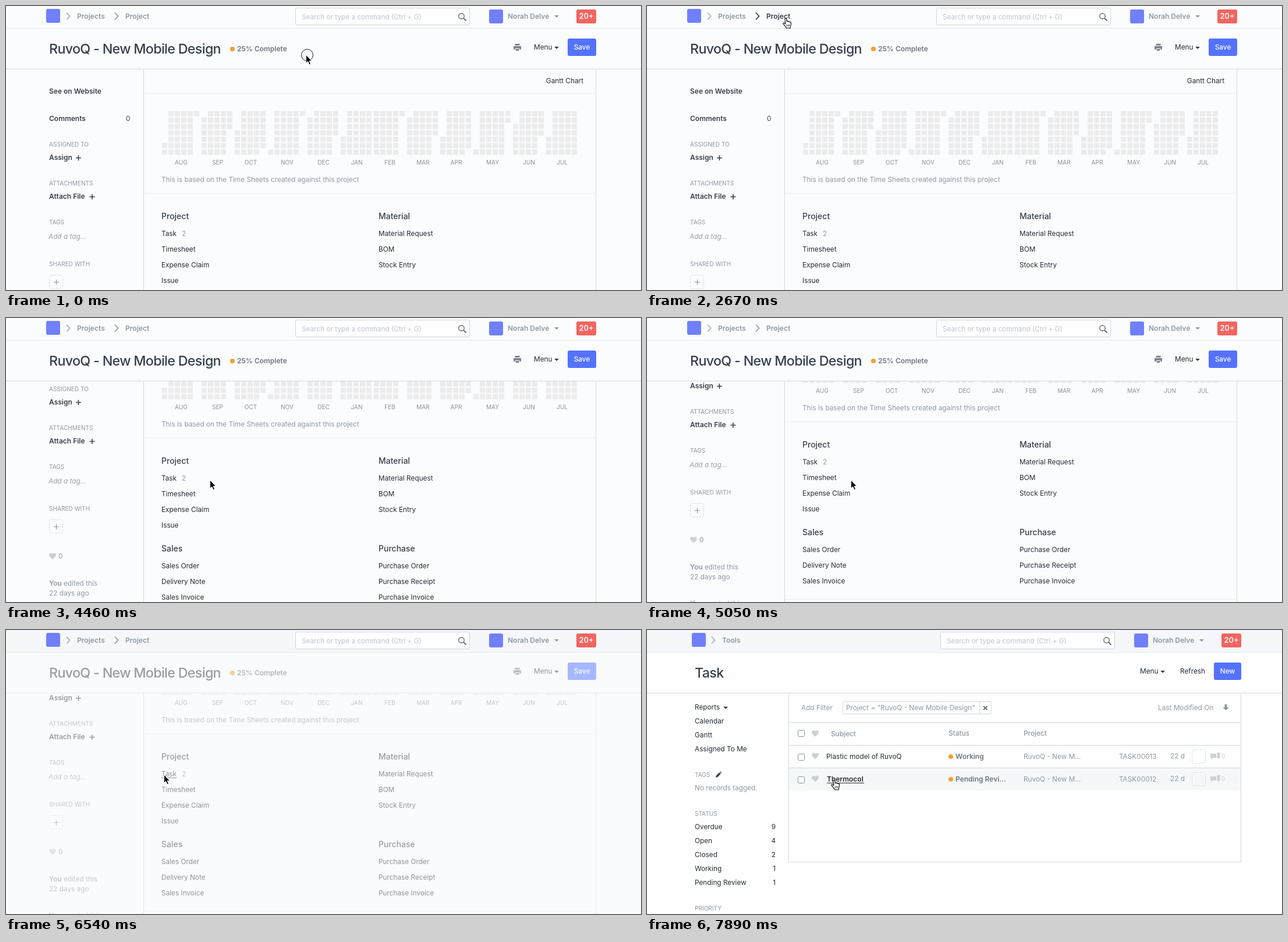
These frames come from a looping animation (1091 by 489 pixels, 8 s). An HTML page:

```html
<!DOCTYPE html>
<html lang="en">
<head>
<meta charset="utf-8">
<title>Project to task list</title>
<style>
html, body { margin: 0; width: 100%; height: 100%; overflow: hidden; background: #fbfcfe; }
svg { display: block; width: 1091px; height: 489px; font-family: Inter, "Open Sans", sans-serif; font-size: 11.8px; }
.semi { font-weight: 600; font-size: 12px; }
.crumb { font-weight: 600; font-size: 12.1px; }
.mid { font-weight: 500; }
.head { font-weight: 500; font-size: 14px; }
.title { font-weight: 500; font-size: 23.3px; letter-spacing: -.03em; }
.label { font-size: 10.1px; }
.badge { font-weight: 600; font-size: 12.8px; }
</style>
</head>
<body>
<svg id="stage" viewBox="0 0 1091 489"></svg>
<script>
const INK = '#36414c', GREY = '#8d99a6', SLATE = '#6c7680', EDGE = '#d1d8dd', PALE = '#ebeef1';
const BLUE = '#5472ff', LOGO = '#7080fb', AMBER = '#f7a030', DARK = '#262d34';
const PRODUCT = 'RuvoQ', PROJECT = PRODUCT + ' - New Mobile Design', USER = 'Norah Delve';

const text = (x, y, s, cls = '', fill = INK, more = '') =>
  `<text x="${x}" y="${y}" class="${cls}" fill="${fill}" ${more}>${s}</text>`;
const rect = (x, y, w, h, fill, more = '') =>
  `<rect x="${x}" y="${y}" width="${w}" height="${h}" fill="${fill}" ${more}/>`;
const path = (d, stroke, width = 1, more = '') =>
  `<path d="${d}" fill="none" stroke="${stroke}" stroke-width="${width}" ${more}/>`;
const shape = (d, fill) => `<path d="${d}" fill="${fill}"/>`;
const dot = (x, y) => `<circle cx="${x}" cy="${y}" r="4" fill="${AMBER}"/>`;
const caret = (x, y, fill = INK) => shape(`M${x} ${y}h8l-4 4z`, fill);
const plus = (x, y, c = INK, r = 4.5, w = 1.6) => path(`M${x - r} ${y}h${2 * r}M${x} ${y - r}v${2 * r}`, c, w);
const chevron = (x, c = '#a9b1b9') => path(`M${x} 11.5l5.5 6-5.5 6`, c, 1.8);
const heart = (x, y) => shape(`M${x} ${y + 5.5}l-5-5c-3-4 2.500-8 5-4 2.500-4 8 0 5 4z`, '#cbd0d5');
const button = (x, w, s) => rect(x, 56, w, 30, BLUE, 'rx="3"') +
  text(x + w / 2, 75, s, 'mid', '#fff', 'text-anchor="middle"');
const dashed = (x, y) => rect(x + .5, y + .5, 23, 23, 'none', `rx="3" stroke="${EDGE}" stroke-dasharray="3 2"`);
const group = (id, body, more = '') => `<g id="${id}" ${more}>${body}</g>`;

// Search box, account and badge shared by both pages
function tools(dx) {
  return `<g transform="translate(${dx})">` +
    rect(497.5, 3.5, 299, 29, '#fefeff', `rx="2" stroke="${EDGE}"`) +
    text(508, 23, 'Search or type a command (Ctrl + G)', '', '#bfc5cb') +
    '<circle cx="782.500" cy="17.500" r="4.700" fill="none" stroke="#5d656d" stroke-width="1.400"/>' +
    path('M786 21l4.500 4.500', '#5d656d', 1.8) +
    rect(830, 6, 24, 24, LOGO, 'rx="3"') +
    text(862, 22, USER, 'semi', GREY) + caret(942, 16, GREY) +
    rect(980, 6, 34, 24, '#f1655f', 'rx="3"') +
    text(997, 22, '20+', 'badge', '#fff', 'text-anchor="middle"') + '</g>';
}

// Calendar columns: a month starts on the weekday where the last one ended
function heatmap() {
  const names = 'AUG SEP OCT NOV DEC JAN FEB MAR APR MAY JUN JUL'.split(' ');
  const days = [31, 30, 31, 30, 31, 31, 29, 31, 30, 31, 30, 31];
  let x = 268, first = 5, out = '';
  names.forEach((name, m) => {
    const end = first + days[m], cols = Math.ceil(end / 7);
    for (let i = first; i < end; i++)
      out += rect(x + 11 * Math.floor(i / 7), 181 + 11 * (i % 7), 9, 9, '#ececed');
    out += text(x + cols * 5.5, 273, name, 'label', '#8c9298', 'text-anchor="middle"');
    x += cols * 11 + 2;
    first = end % 7;
  });
  return out;
}

function links(x, y, title, items) {
  return text(x, y, title, 'head') + items.map((s, i) => text(x, y + 29 + 27 * i, s, '', DARK)).join('');
}

function projectPage() {
  const labels = [[242, 'ASSIGNED TO'], [309, 'ATTACHMENTS'], [376, 'TAGS'], [448, 'SHARED WITH']];
  const content =
    text(74, 151, 'See on Website', 'semi') + text(74, 198, 'Comments', 'semi') + text(206, 198, '0') +
    labels.map(([y, s]) => text(74, y, s, 'label', GREY)).join('') +
    text(74, 265, 'Assign', 'semi') + plus(124.5, 261.5) +
    text(74, 332, 'Attach File', 'semi') + plus(148, 328.5) +
    text(73, 401, 'Add a tag...', '', '#98a0a8', 'font-style="italic"') +
    dashed(74, 463) + plus(86.5, 475.5, GREY, 4.5, 1.2) +
    heart(80, 526) + text(90, 530, '0', '', GREY) +
    text(74, 577, '<tspan font-weight="600">You</tspan> edited this', '', GREY) +
    text(74, 594, '22 days ago', '', GREY) +
    text(74, 640, '<tspan font-weight="600">You</tspan> created this', '', GREY) +
    text(992, 133, 'Gantt Chart', '', DARK, 'text-anchor="end"') +
    path('M237 150.5h776M237 322.5h776M237 628.5h776', PALE) + heatmap() +
    text(267, 303, 'This is based on the Time Sheets created against this project', '', GREY) +
    links(267, 367, 'Project', ['Task', 'Timesheet', 'Expense Claim', 'Issue']) +
    text(302, 396, '2', '', GREY) +
    group('taskLine', path('M267 398.5h26', DARK)) +
    links(640, 367, 'Material', ['Material Request', 'BOM', 'Stock Entry']) +
    links(267, 518, 'Sales', ['Sales Order', 'Delivery Note', 'Sales Invoice']) +
    links(640, 518, 'Purchase', ['Purchase Order', 'Purchase Receipt', 'Purchase Invoice']);
  return rect(0, 0, 1091, 489, '#fbfcfe') +
    `<g clip-path="url(#below)">${group('scroll', content)}</g>` +
    path('M236.5 109V489M1013.5 109V489', EDGE) +
    text(74, 82, PROJECT, 'title') + dot(389, 74) + text(397, 78, '25% Complete', 'semi', SLATE) +
    shape('M874.500 65h8v3h-8zM872 69h13v6h-2.500v-2h-8v2H872zM875.500 74h6v3h-6z', '#7d8790') +
    text(907, 75, 'Menu', '', DARK) + caret(942, 70) + button(965, 49, 'Save') +
    path('M0 108.5H1091', EDGE) +
    group('freeze', rect(0, 39, 1091, 450, '#fafbfc') + rect(896, 56, 64, 30, '#f1f4f6', 'opacity=".3"')) +
    group('bar', rect(0, 0, 1091, 38, '#f5f7fa')) + path('M0 38.5H1091', '#e3e7ea') +
    rect(69, 5, 24, 24, LOGO, 'rx="3"') + chevron(104) + text(122, 22, 'Projects', 'crumb', GREY) +
    group('crumb', chevron(187, 'currentColor') + text(205, 22, 'Project', 'crumb', 'currentColor')) + tools(0);
}

function taskRow(y, subject, status, id) {
  return rect(259.5, y - 3.5, 11, 11, '#fff', 'rx="2" stroke="#8b8f93"') + heart(289, y) +
    subject + dot(522, y + 1) + text(530, y + 5, status, 'semi', SLATE) +
    text(647, y + 5, PRODUCT + ' - New M...', '', GREY) + text(811, y + 5, id, '', GREY) +
    text(899, y + 4, '22 d', '', GREY) + dashed(936, y - 11) +
    shape(`M968 ${y - 4}h10v7h-5l-3 3v-3h-2zM979.500 ${y - 6}h5v9h-1v3l-3-3h-4l3-1z`, '#ccd1d6') +
    text(987, y + 4, '0', 'label', '#ccd1d6');
}

function taskPage() {
  const menu = [[137, 'Reports'], [161, 'Calendar'], [185, 'Gantt'], [209, 'Assigned To Me']];
  const counts = [['Overdue', 9], ['Open', 4], ['Closed', 2], ['Working', 1], ['Pending Review', 1]];
  const rows =
    group('hoverRow', rect(244, 238, 776, 38, '#f5f8fa')) + path('M244 237.5h776', EDGE) +
    taskRow(217, text(308, 222, 'Plastic model of ' + PRODUCT, '', DARK), 'Working', 'TASK00013') +
    taskRow(256, text(309, 261, 'Thermocol', 'semi', DARK) +
      group('nameLine', path('M309 263.5h64', DARK)), 'Pending Revi...', 'TASK00012');
  return rect(0, 0, 1091, 489, '#fefefe') + rect(0, 0, 1091, 38, '#f5f7fa') +
    path('M0 38.5H1091', '#e3e7ea') + path('M0 108.5H1091', EDGE) +
    rect(77, 5, 24, 24, LOGO, 'rx="3"') + chevron(111) + text(129, 22, 'Tools', 'crumb', GREY) + tools(7) +
    text(82, 82, 'Task', 'title') + text(847, 75, 'Menu', '', DARK) + caret(882, 70) +
    text(916, 75, 'Refresh', '', DARK) + button(974, 47, 'New') +
    menu.map(([y, s]) => text(82, y, s, '', DARK)).join('') + caret(131, 132) +
    text(82, 253, 'TAGS', 'label', GREY) + shape('M118 254l.8-3.200 5.500-5.500 2.400 2.400-5.500 5.500zM125 244.600l1-1 2.400 2.400-1 1z', INK) +
    text(82, 276, 'No records tagged.', '', GREY) +
    text(82, 320, 'STATUS', 'label', GREY) + text(82, 483, 'PRIORITY', 'label', GREY) +
    counts.map(([s, n], i) => text(82, 343 + 24 * i, s, '', DARK) +
      text(221, 343 + 24 * i, n, '', DARK, 'text-anchor="end"')).join('') +
    text(265, 138, 'Add Filter', '', GREY) +
    rect(336.5, 123.5, 255, 21, 'none', `rx="2" stroke="${EDGE}"`) + path('M571.5 124v20', EDGE) +
    text(342, 138, `Project = "${PROJECT}"`, '', GREY) +
    path('M578 131l6.500 6.500m0-6.500l-6.500 6.500', SLATE, 2.2) +
    text(878, 138, 'Last Modified On', '', GREY) +
    shape('M992.500 128h4v5h3l-5 5.500-5-5.500h3z', GREY) +
    rect(259.5, 172.5, 11, 11, '#fff', 'rx="2" stroke="#8b8f93"') + heart(289, 178) +
    text(316, 183, 'Subject', 'mid', GREY) + text(518, 182, 'Status', 'mid', GREY) + text(647, 182, 'Project', 'mid', GREY) +
    group('rows', rows) +
    path('M243.5 109V399.5H1020.5V109M244 159.5h776M244 198.5h776', EDGE);
}

const cursor = group('cursor',
  group('ring', '<circle cx="2.500" cy=".5" r="10" fill="none" stroke="#111"/>') +
  group('arrow', '<path d="M.5 0V14.500L3.800 11.500 6 17 8.500 16 6.200 10.700H10.500Z" fill="#000" stroke="#fff"/>') +
  group('hand', '<path d="M0 2.800C0 .8 2.600 .8 2.800 2.800L3.300 7C3.600 5.400 6 5.600 6 7.200 6.500 6.200 8.400 6.500 8.500 8 9.200 7.200 10.600 7.800 10.500 9.200 10.500 12 9.500 13.500 9.200 18H2.200C1.800 15-1.500 13-3 10.500-3.600 9-1.500 8.300-.3 9.800L.8 11Z" fill="#fff" stroke="#000" stroke-width="1.100" stroke-linejoin="round"/>' +
    path('M3.5 12v3M5.500 12v3M7.500 12v3', '#000', .8)));

document.getElementById('stage').innerHTML =
  '<defs><clipPath id="below"><rect y="109" width="1091" height="380"/></clipPath></defs>' +
  group('project', projectPage()) + group('task', taskPage()) + cursor;

// time, x, y, pointer
const moves = [
  [0, 515, 84, 'arrow'], [1790, 504, 81, 'arrow'], [1940, 463, 72, 'arrow'], [2090, 418, 56, 'arrow'],
  [2240, 360, 40, 'arrow'], [2390, 302, 30, 'arrow'], [2540, 256, 22, 'hand'], [2670, 237, 20, 'hand'],
  [3420, 300, 14, 'arrow'], [3570, 336, 100, 'arrow'], [3710, 349, 235, 'arrow'], [3860, 350, 279, 'arrow'],
  [5350, 346, 277, 'arrow'], [5500, 330, 270, 'arrow'], [5650, 306, 260, 'arrow'], [5800, 286, 253, 'hand'],
  [5950, 271, 249, 'hand'], [6390, 271, 249, 'arrow'], [6990, 270, 250, 'hand'],
  [7740, 296, 253, 'hand'], [7890, 320, 257, 'hand']
];
const scrolls = [[0, 0], [4160, 64], [4310, 94], [4460, 116], [4600, 132], [4750, 140], [5050, 144]];
const freezes = [[0, 0], [6390, .25], [6540, .5]];

const at = (steps, t) => steps.filter(s => s[0] <= t).pop();
const $ = id => document.getElementById(id);
const show = (id, on) => { $(id).style.display = on ? '' : 'none'; };
const between = (t, a, b) => t >= a && t < b;

function draw(t) {
  const [, x, y, kind] = at(moves, t);
  $('cursor').setAttribute('transform', `translate(${x} ${y})`);
  show('arrow', kind === 'arrow');
  show('hand', kind === 'hand');
  show('ring', t < 140 || between(t, 6240, 6390));
  $('scroll').setAttribute('transform', `translate(0 ${-at(scrolls, t)[1]})`);
  $('freeze').style.opacity = at(freezes, t)[1];
  $('crumb').style.color = between(t, 2540, 3420) ? INK : GREY;
  show('bar', t >= 6540);
  show('taskLine', t >= 5800);
  show('project', t < 6690);
  show('task', t >= 6690);
  show('rows', t >= 6840);
  show('hoverRow', t >= 6990);
  show('nameLine', t >= 7890);
}

const start = performance.now();
function tick() {
  draw((performance.now() - start) % 8000);
  requestAnimationFrame(tick);
}
tick();
</script>
</body>
</html>
```
